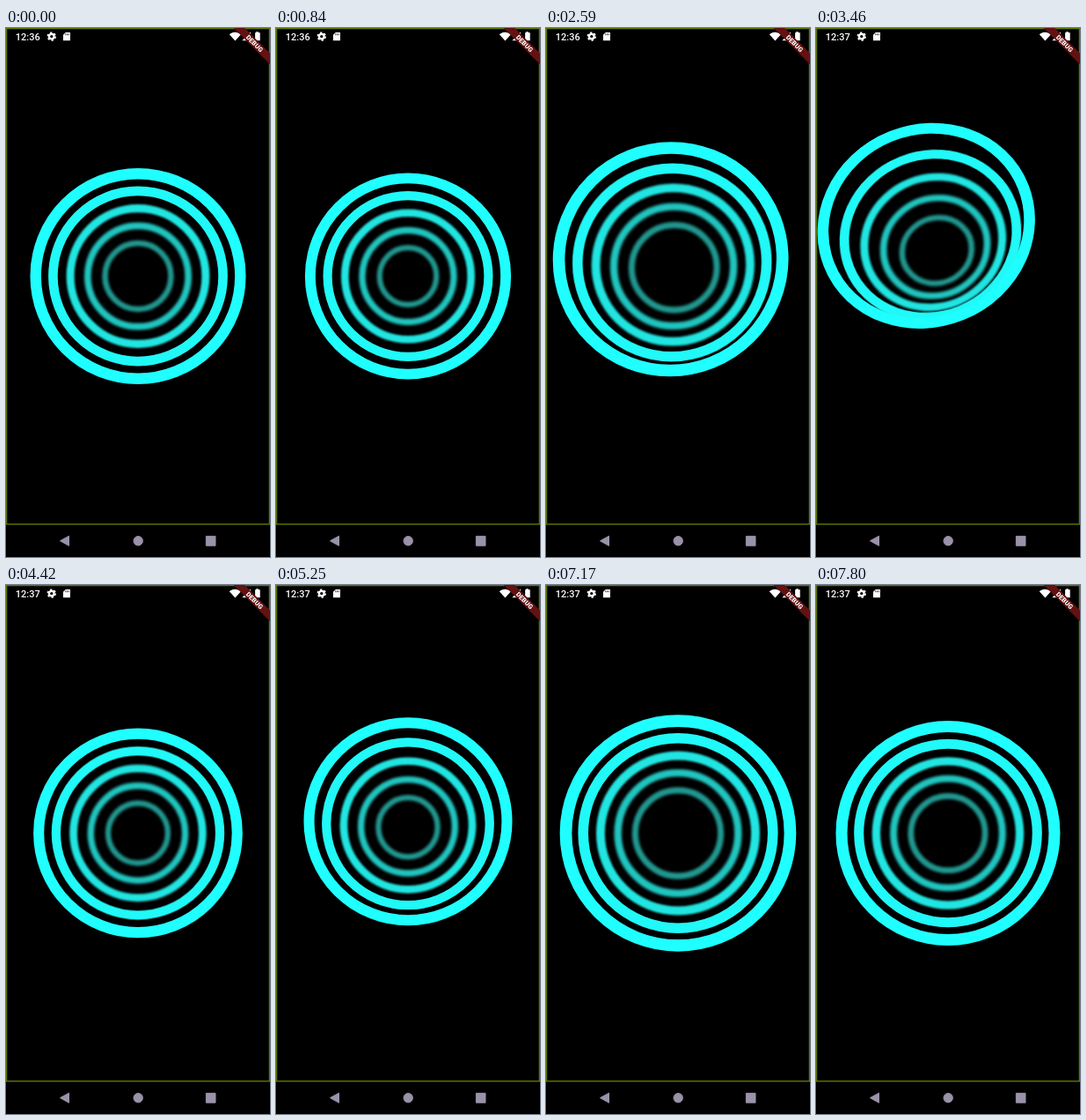
Animation, 300 px wide and 600 px high, one loop 8000 ms. Source, as an HTML page:

```html
<!DOCTYPE html>
<html lang="en">
<head>
<meta charset="utf-8">
<title>Pulsing rings</title>
<style>
  html, body { margin: 0; width: 100%; height: 100%; overflow: hidden; background: #000; }
  svg { display: block; width: 300px; height: 600px; }
  text { font-family: Roboto, "Noto Sans", sans-serif; fill: #fff; }
</style>
</head>
<body>
<svg viewBox="0 0 300 600">
  <rect width="300" height="600"/>
  <g id="rings" fill="none"></g>

  <rect x=".6" y=".6" width="298.8" height="562.2" fill="none" stroke="#5f7800" stroke-width="1.4"/>

  <text id="clock" x="10.8" y="13.6" font-size="11" font-weight="500">12:36</text>
  <g fill="#fff">
    <circle cx="51.8" cy="9.6" r="2.8" fill="none" stroke="#fff" stroke-width="2.2"/>
    <circle cx="51.8" cy="9.6" r="4.4" fill="none" stroke="#fff" stroke-width="1.6" stroke-dasharray="2.4 2.208"/>
    <path d="M67.8 5H73V14.2H65V7.8Z"/>
    <path d="M67.7 6.4v1.8M69.5 6.4v1.8M71.3 6.4v1.8" stroke="#000" stroke-width=".8"/>
    <path d="M253.8 7.2Q260.4 2.2 267 7.2L260.4 14.4Z"/>
    <path d="M278 4.6V14.2H268.4Z"/>
    <path d="M284.3 4.2h2.4v1.1h2v9h-5.6v-9h1.2Z"/>
  </g>

  <g transform="translate(282.5 17.5) rotate(45)">
    <rect x="-40" y="-4.4" width="80" height="8.8" fill="#641111"/>
    <text y="2.7" font-size="7.4" font-weight="900" text-anchor="middle">DEBUG</text>
  </g>

  <g fill="#9a92a8" stroke="#9a92a8" stroke-linejoin="round">
    <path d="M61.5 581.7L71.5 576.2V587.3Z"/>
    <circle cx="150.2" cy="581.7" r="5.2"/>
    <rect x="227.4" y="576.4" width="10.6" height="10.8"/>
  </g>
</svg>

<script>
const LOOP = 8000, COUNT = 5, GAP = 19.7, DEPTH = 157;
const PULSE = { mean: 126.1, swing: 9.1, period: 4080, low: 760 };

// drags that tilt the tunnel: peak time, half length, shift of the nearest ring
const DRAGS = [
  { peak: 3300, half: 1150, x: -26, y: -60 },
  { peak: 5600, half: 650, x: 0, y: -30 }
];

const group = document.getElementById('rings');
const clock = document.getElementById('clock');

// each ring further away is thinner, softer and darker
function makeRing(depth) {
  const el = document.createElementNS('http://www.w3.org/2000/svg', 'circle');
  const level = 255 - 6.5 * depth ** 2;
  el.setAttribute('stroke', `rgb(32 ${level} ${level - 2 * depth})`);
  if (depth) el.style.filter = `blur(${.4 + .35 * depth}px)`;
  group.append(el);
  return { el, depth, width: 12.5 * .85 ** depth, share: 1 / (1 + .24 * depth) };
}

const rings = Array.from({ length: COUNT }, (_, i) => makeRing(COUNT - 1 - i));

function tiltAt(t) {
  let x = 0, y = 0;
  for (const d of DRAGS) {
    const u = Math.min(1, Math.abs(t - d.peak) / d.half);
    const pull = Math.cos(u * Math.PI / 2) ** 2;
    x += d.x * pull;
    y += d.y * pull;
  }
  return [x, y];
}

function draw(t) {
  const [dx, dy] = tiltAt(t);
  const sin2 = (dx * dx + dy * dy) / DEPTH ** 2;
  const wave = Math.cos(2 * Math.PI * (t - PULSE.low) / PULSE.period);
  // tilting also moves the rings away from the viewer
  const outer = PULSE.mean - PULSE.swing * wave - 36 * sin2;
  const squash = Math.sqrt(1 - sin2);
  const angle = Math.atan2(dy, dx) * 180 / Math.PI;

  for (const { el, depth, width, share } of rings) {
    el.setAttribute('r', outer * .949 - GAP * depth);
    el.setAttribute('stroke-width', width * outer / 122.5);
    el.setAttribute('transform',
      `translate(${150 + dx * share} ${281.5 + dy * share}) ` +
      `rotate(${angle}) scale(${squash} 1) rotate(${-angle})`);
  }
  clock.textContent = t < 2700 ? '12:36' : '12:37';
}

const start = performance.now();
function tick() {
  draw((performance.now() - start) % LOOP);
  requestAnimationFrame(tick);
}
tick();
</script>
</body>
</html>
```
